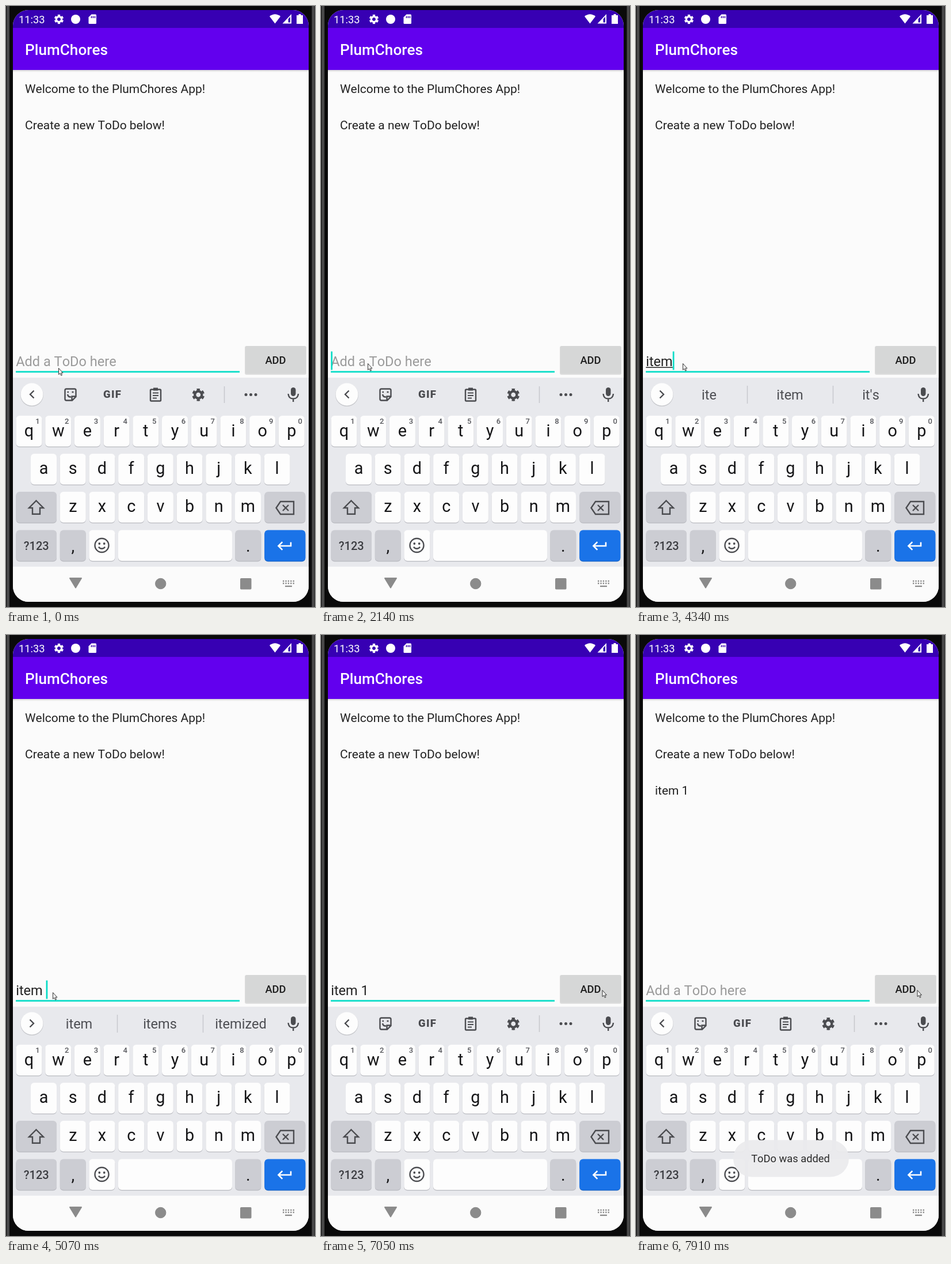
Animation of 537x1043 px, one loop 8 s. Source, as an HTML page:

```html
<!DOCTYPE html>
<html lang="en">
<head>
<meta charset="utf-8">
<title>PlumChores</title>
<style>
  html, body { margin: 0; width: 100%; height: 100%; overflow: hidden; background: #0a0a0a; }
  svg { display: block; width: 100vw; height: 100vh; }
  text { font-family: Roboto, sans-serif; font-size: 23.56px; font-kerning: none; white-space: pre; }
  .mid { text-anchor: middle; }
  .medium { font-weight: 500; }
  .small { font-size: 18.32px; }
  .title { font-size: 26.18px; }
  .list { font-size: 20.94px; fill: #212121; }
  .letter { font-size: 28.8px; fill: #151517; }
  .digits { font-size: 20px; font-weight: 500; fill: #3c3d42; }
  .hint { font-size: 13px; fill: #55565b; font-weight: 500; }
  .word { fill: #4d4e53; }
  .icon { fill: none; stroke: #4b4c50; stroke-width: 2.4; }
  .solid { fill: #4b4c50; stroke: none; }
</style>
</head>
<body>
<svg viewBox="0 0 537 1043" preserveAspectRatio="none">
  <defs>
    <clipPath id="screen"><rect x="12" y="7" width="514" height="1027" rx="27"/></clipPath>
    <linearGradient id="shade" x2="0" y2="1">
      <stop offset="0" stop-color="#000" stop-opacity=".15"/>
      <stop offset="1" stop-color="#000" stop-opacity="0"/>
    </linearGradient>
    <symbol id="gear" viewBox="-10 -10 20 20">
      <g fill="none" stroke="currentColor">
        <circle r="5.4" stroke-width="3.8"/>
        <circle r="8.2" stroke-width="3" pathLength="6" stroke-dasharray=".56 .44" stroke-dashoffset="-.22"/>
      </g>
    </symbol>
  </defs>

  <!-- phone body -->
  <rect width="537" height="1043" fill="#0a0a0a"/>
  <path d="M3.500 0V1043M534 0V1043" stroke="#484848" stroke-width="5"/>

  <g clip-path="url(#screen)">
    <rect x="12" y="7" width="514" height="1027" fill="#fbfbfb"/>
    <rect x="12" y="111" width="514" height="4" fill="url(#shade)"/>
    <rect x="12" y="38" width="514" height="73" fill="#6200ee"/>
    <rect x="12" y="7" width="514" height="31" fill="#3700b3"/>

    <!-- status bar -->
    <g fill="#fff">
      <text x="22" y="30" class="small">11:33</text>
      <use href="#gear" x="83.500" y="14.500" width="17" height="17" color="#fff"/>
      <circle cx="121" cy="23" r="8"/>
      <path d="M148.500 14.500H155.500Q157 14.500 157 16V29.500Q157 31 155.500 31H145Q143.500 31 143.500 29.500V19.500Z"/>
      <path d="M148.500 17.500V21M151.500 17.500V21M154.500 17.500V21" stroke="#3700b3" stroke-width="1.6"/>
      <path d="M467.500 30.500L458 18Q467.500 10.500 477 18Z"/>
      <path d="M480.500 30.500H496V14ZM490.500 22.500V28.500H494V18.700Z" fill-rule="evenodd"/>
      <path d="M508.500 14H512.500V16H516V31H505V16H508.500Z"/>
      <text x="33" y="85" class="medium title">PlumChores</text>
    </g>

    <text class="list" x="33" y="151.400">Welcome to the PlumChores App!</text>
    <text class="list" x="33" y="214.200">Create a new ToDo below!</text>
    <text class="list" x="33" y="277" id="added">item 1</text>

    <!-- input row -->
    <text id="entry" x="17.200" y="625"/>
    <rect id="underline" x="17.200" y="626.500" height="1.5" fill="#222"/>
    <rect x="17" y="633.500" width="389" height="2.700" fill="#03dcc6"/>
    <rect id="caret" y="599.500" width="2.700" height="32" fill="#03dcc6"/>
    <rect x="415" y="590" width="107" height="50" rx="3" fill="#000" opacity=".12"/>
    <rect id="button" x="416" y="590" width="105" height="48" rx="2.500"/>
    <text x="468.500" y="621" class="mid medium small" fill="#1d1d1d">ADD</text>

    <!-- keyboard -->
    <rect x="12" y="645" width="514" height="328" fill="#e8e9ed"/>
    <circle cx="45" cy="675" r="20" fill="#c9cace"/>
    <circle cx="45" cy="674" r="19.500" fill="#fdfdfd"/>
    <path id="chevron" class="icon"/>
    <g class="icon">
      <rect x="495" y="662" width="8.500" height="15" rx="4.200" class="solid"/>
      <path d="M490.500 673Q491 681.500 499.200 681.500T508 673M499.200 681V687"/>
    </g>

    <g id="tools">
      <g class="icon">
        <path d="M105 664.500H119Q121.500 664.500 121.500 667V678L115 684.500H105Q102.500 684.500 102.500 682V667Q102.500 664.500 105 664.500ZM121 677.500H114.500V684M107 674Q108 679 113 678.500M106.500 670H109M114.500 670H117.500"/>
        <rect x="251" y="665.500" width="18" height="20" rx="1.500"/>
        <path d="M255 671.500H265M255 676H265M255 680.500H262" stroke-width="2.200"/>
        <path d="M256 665H264" stroke-width="5"/>
      </g>
      <text x="169" y="680" class="solid" style="font-size:18.5px;font-weight:900;letter-spacing:1.3px">GIF</text>
      <use href="#gear" x="323" y="663.500" width="22.500" height="22.500" color="#4b4c50"/>
      <path d="M379.500 660V689" stroke="#c6c7cc" stroke-width="1.500"/>
      <path d="M417 674.500H435" stroke="#4b4c50" stroke-width="5" stroke-linecap="round" stroke-dasharray="0 8.500"/>
    </g>
    <g id="words">
      <path d="M193.500 659V690M342.500 659V690" stroke="#c6c7cc" stroke-width="1.500"/>
      <text class="word mid" x="127" y="683"/>
      <text class="word mid" x="267.500" y="683"/>
      <text class="word mid" x="408" y="683"/>
    </g>

    <g id="keys"></g>
    <g class="icon">
      <path d="M52.500 858.500L65 871H59V881.800H46V871H40Z"/>
      <path d="M477 860H500V882H477L469.500 871ZM481 866L491 876M491 866L481 876"/>
      <circle cx="166.500" cy="936" r="12"/>
      <path d="M161 938.600Q163 941.800 166.500 941.800T172 938.600"/>
      <circle cx="162.300" cy="933" r="1.900" class="solid"/>
      <circle cx="170.700" cy="933" r="1.900" class="solid"/>
    </g>
    <path transform="translate(469 921.400) scale(1.3)" fill="#fff"
      d="M19 7V11H5.800L9.400 7.400L8 6L2 12L8 18L9.400 16.600L5.800 13H21V7Z"/>

    <!-- navigation bar -->
    <rect x="12" y="973" width="514" height="62" fill="#fbfbfb"/>
    <g fill="#8b8b8b" stroke="#8b8b8b">
      <path d="M111 993H131L121 1009.500Z" stroke-width="2" stroke-linejoin="round"/>
      <circle cx="268.700" cy="1002.500" r="9.200"/>
      <rect x="407.500" y="993.500" width="18.500" height="18.500" rx="1"/>
      <path d="M481 998H501M481 1002H501" stroke-width="2.300" stroke-dasharray="2.300 2.100"/>
      <path d="M485 1007H497" stroke-width="2.300"/>
    </g>

    <g id="toast">
      <rect x="169" y="876.500" width="201" height="64" rx="32" fill="#ebebed" opacity=".93"/>
      <text class="mid small" x="268.500" y="915" fill="#2b2b2b">ToDo was added</text>
    </g>
  </g>

  <path id="pointer" d="M.5 .5V11.500L3 9.500L4.800 13.300L6.500 12.500L4.800 8.800H8Z" fill="#f4f4f4" stroke="#222" stroke-width=".9"/>
</svg>

<script>
const $ = id => document.getElementById(id);
const LOOP = 8000, PITCH = 50.7, KEY = 45, ENTRY_X = 17.2;
const LIGHT = '#fdfdfd', DARK = '#cccdd3', SHADOW = '#b9bac0';

function key({ x, y, w = KEY, fill = LIGHT, shadow = SHADOW, label = '', style = 'letter', baseline = 35, hint = '' }) {
  const rect = (top, color) =>
    `<rect x="${x}" y="${top}" width="${w}" height="53.5" rx="6" fill="${color}"/>`;
  const text = (cls, tx, ty, content) =>
    `<text class="mid ${cls}" x="${tx}" y="${ty}">${content}</text>`;
  return rect(y + 1.3, shadow) + rect(y, fill) +
    text(style, x + w / 2, y + baseline, label) + text('hint', x + w - 7.5, y + 14, hint);
}
const row = (letters, x, y, options = () => ({})) =>
  [...letters].map((label, i) => key({ x: x + PITCH * i, y, label, ...options(i) }));

const BOTTOM = 909.5;
$('keys').innerHTML = [
  ...row('qwertyuiop', 17.5, 711, i => ({ hint: (i + 1) % 10, baseline: 36 })),
  ...row('asdfghjkl', 43, 777),
  ...row('zxcvbnm', 93.8, 843),
  key({ x: 17.5, y: 843, w: 70.5, fill: DARK }),
  key({ x: 449.3, y: 843, w: 71, fill: DARK }),
  key({ x: 17.5, y: BOTTOM, w: 70.5, fill: DARK, label: '?123', style: 'digits', baseline: 34 }),
  key({ x: 93.8, y: BOTTOM, fill: DARK, label: ',', baseline: 37.5 }),
  key({ x: 144.3, y: BOTTOM }),
  key({ x: 195, y: BOTTOM, w: 198 }),
  key({ x: 398.3, y: BOTTOM, fill: DARK, label: '.', baseline: 37.5 }),
  key({ x: 449.3, y: BOTTOM, w: 71, fill: '#1a73e8', shadow: '#1763c6' })
].join('');

// Each step changes only the listed properties; the rest carries over.
const steps = [
  [0, { pointer: [91, 628], caret: 0, text: '', composing: 0, words: null, pressed: 0, added: 0, toast: 0 }],
  [150, { caret: 1 }],
  [580, { pointer: [90, 626] }],
  [720, { pointer: [88, 622], caret: 0 }],
  [860, { pointer: [87, 620] }],
  [1140, { caret: 1 }],
  [1440, { pointer: [84, 620] }],
  [1560, { pointer: [81, 620], caret: 0 }],
  [2140, { caret: 1 }],
  [2570, { text: 'i', composing: 1 }],
  [2690, { words: ['I', "I'm", 'it'] }],
  [2980, { text: 'ite', composing: 3, words: ['it', "it's", 'if'] }],
  [3130, { words: ['ite', 'item', "it's"] }],
  [3720, { caret: 0 }],
  [4020, { text: 'item', caret: 1 }],
  [4340, { composing: 4 }],
  [4490, { words: ['item', 'items', 'itemized'] }],
  [4770, { caret: 0 }],
  [5070, { text: 'item ', composing: 0, caret: 1 }],
  [5220, { words: ['is', 'and', 'in'] }],
  [5370, { text: 'item 1' }],
  [5650, { words: null }],
  [5800, { caret: 0 }],
  [6390, { caret: 1 }],
  [6670, { pointer: [150, 612] }],
  [6800, { pointer: [305, 596] }],
  [6930, { pointer: [442, 602], caret: 0 }],
  [7050, { pointer: [488.5, 616] }],
  [7330, { pressed: 1 }],
  [7480, { text: '', added: 1, caret: 1 }],
  [7620, { pressed: 0, toast: .3 }],
  [7760, { toast: .7 }],
  [7910, { toast: 1, caret: 0 }]
];
let carried = {};
const states = steps.map(([at, change]) => [at, carried = { ...carried, ...change }]);

const show = (id, on) => $(id).setAttribute('opacity', Number(on));
const wordSlots = $('words').querySelectorAll('text');

function draw(s) {
  const entry = $('entry');
  entry.textContent = s.text || 'Add a ToDo here';
  entry.setAttribute('fill', s.text ? '#222' : '#9b9b9b');
  const widthOf = n => n ? entry.getSubStringLength(0, n) : 0;
  $('caret').setAttribute('x', ENTRY_X + widthOf(s.text.length));
  $('underline').setAttribute('width', widthOf(s.composing));
  $('button').setAttribute('fill', s.pressed ? '#c3c4c4' : '#d6d7d7');
  $('chevron').setAttribute('d', s.words ? 'M41.5 667.5L48 674L41.5 680.5' : 'M48.5 667.5L42 674L48.5 680.5');
  $('pointer').setAttribute('transform', `translate(${s.pointer})`);
  wordSlots.forEach((slot, i) => slot.textContent = s.words ? s.words[i] : '');
  show('caret', s.caret);
  show('tools', !s.words);
  show('words', !!s.words);
  show('added', s.added);
  show('toast', s.toast);
}

const start = performance.now();
let current;
function frame() {
  const t = (performance.now() - start) % LOOP;
  const state = states.findLast(([at]) => at <= t)[1];
  if (state !== current) draw(current = state);
  requestAnimationFrame(frame);
}
frame();
</script>
</body>
</html>
```
